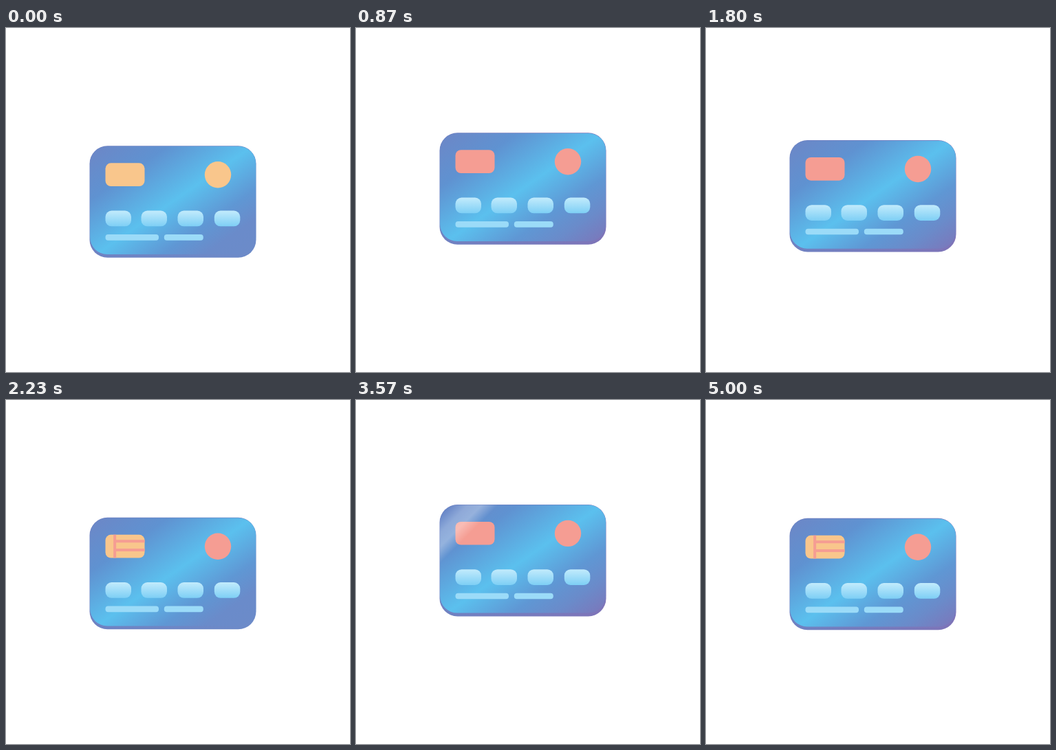
Animation, 500 px wide and 500 px high, one loop 5060 ms. Source, as an HTML page:

```html
<!DOCTYPE html>
<html lang="en">
<head>
<meta charset="utf-8">
<title>Floating card</title>
<style>
  html, body { margin: 0; width: 100%; height: 100%; overflow: hidden; background: #fff; }
  svg { display: block; width: 100%; height: 100%; }
</style>
</head>
<body>
<svg viewBox="0 0 500 500">
  <defs>
    <linearGradient id="face" gradientUnits="userSpaceOnUse" x1="44" y1="-30" x2="198" y2="192">
      <stop offset="0" stop-color="#6d86c6"/>
      <stop offset=".24" stop-color="#5f92d1"/>
      <stop offset=".5" stop-color="#5bc0ee"/>
      <stop offset=".7" stop-color="#5f97d4"/>
      <stop offset=".83" stop-color="#6a8bca"/>
      <stop offset="1" class="corner"/>
    </linearGradient>
    <linearGradient id="edge">
      <stop offset="0" stop-color="#6f82c2"/>
      <stop offset="1" class="corner"/>
    </linearGradient>
    <linearGradient id="digit" x2="0" y2="1">
      <stop offset="0" stop-color="#c2ebfc"/>
      <stop offset="1" stop-color="#7ecff5"/>
    </linearGradient>
    <linearGradient id="gleam" gradientUnits="userSpaceOnUse" x1="-17" y1="-17" x2="17" y2="17">
      <stop offset="0" stop-color="#fff" stop-opacity="0"/>
      <stop offset=".35" stop-color="#fff" stop-opacity=".26"/>
      <stop offset=".65" stop-color="#fff" stop-opacity=".32"/>
      <stop offset="1" stop-color="#fff" stop-opacity="0"/>
    </linearGradient>
  </defs>
  <g id="card">
    <rect width="242" height="162.5" rx="26" fill="url(#edge)"/>
    <rect x=".6" y=".7" width="241" height="157" rx="25" fill="url(#face)"/>
    <rect id="chip" x="23" y="25" width="57" height="33.7" rx="8"/>
    <path id="lines" d="M36.6 25v33.7M38 34.5h42M38 47.3h42" fill="none" stroke="#f59d93" stroke-width="4"/>
    <circle id="badge" cx="186.5" cy="42" r="19.2"/>
    <g fill="url(#digit)">
      <rect x="23" y="94.3" width="37.5" height="22.7" rx="9"/>
      <rect x="75" y="94.3" width="37.5" height="22.7" rx="9"/>
      <rect x="128" y="94.3" width="37.5" height="22.7" rx="9"/>
      <rect x="181.3" y="94.3" width="37.5" height="22.7" rx="9"/>
    </g>
    <g fill="#9bdbf8">
      <rect x="23" y="128.8" width="77.5" height="8.6" rx="4"/>
      <rect x="108.3" y="128.8" width="57" height="8.6" rx="4"/>
    </g>
    <rect x=".6" y=".7" width="241" height="157" rx="25" fill="url(#gleam)"/>
  </g>
</svg>
<script>
const LOOP = 5060, CYCLE = LOOP / 2;
const ORANGE = '#f9c68c', PINK = '#f59d93';
const $ = id => document.getElementById(id);
const corners = document.querySelectorAll('.corner');

// [time, card top]: rise and fall, each overshooting before it settles
const bob = [[0, 171.3], [170, 171.3], [750, 150.1], [880, 152.3], [1040, 151.9],
  [1500, 152], [2090, 173.2], [2230, 170.8], [2470, 171.8], [CYCLE, 171.3]];

function cardTop(c) {
  const i = bob.findIndex(([time]) => time > c);
  const [t0, y0] = bob[i - 1], [t1, y1] = bob[i];
  return y0 + (y1 - y0) * (1 - Math.cos(Math.PI * (c - t0) / (t1 - t0))) / 2;
}

function draw(now) {
  const t = now % LOOP, c = t % CYCLE, y = cardTop(c);
  const opening = t < 70, low = y > 163;
  const blue = opening || (t > 2000 && t < 2600);

  $('card').setAttribute('transform', `translate(121.5 ${y})`);
  $('chip').setAttribute('fill', low ? ORANGE : PINK);
  $('lines').setAttribute('visibility', low && !opening ? 'visible' : 'hidden');
  $('badge').setAttribute('fill', opening ? ORANGE : PINK);
  corners.forEach(s => s.setAttribute('stop-color', blue ? '#6c8bc9' : '#7e74b8'));

  const shift = (51 + (c - 1040) * 1.027) / 2;
  $('gleam').setAttribute('gradientTransform', `translate(${shift} ${shift})`);
}

function tick() {
  draw(performance.now());
  requestAnimationFrame(tick);
}
tick();
</script>
</body>
</html>
```
